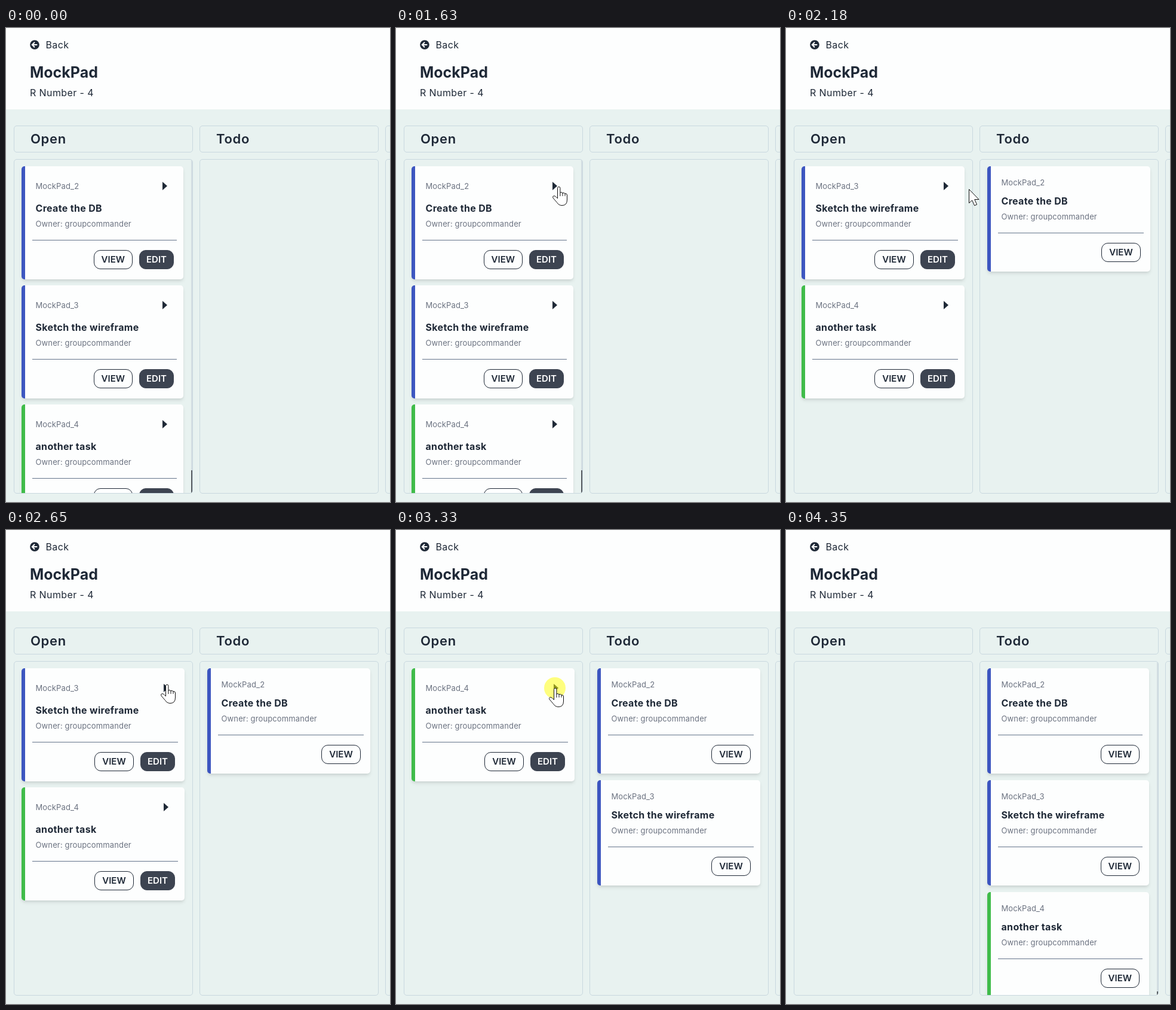
An HTML page for the animation above (4.7 s loop, 643 px wide and 792 px high).

```html
<!DOCTYPE html>
<html lang="en">
<head>
<meta charset="utf-8">
<title>Task board</title>
<style>
  * { box-sizing: border-box; }
  html, body { margin: 0; width: 100%; height: 100%; overflow: hidden; }
  body {
    position: relative; background: #e8f2f0; color: #1f2937;
    font: 16px/20px Inter, sans-serif;
  }
  header, header > *, .head, .list, .card > *, svg, #spot { position: absolute; white-space: nowrap; }
  header { inset: 0 0 auto; height: 136px; background: #fdfefe; }
  header span { letter-spacing: .025em; }
  h1 { left: 40px; top: 63.5px; margin: 0; font-size: 25px; line-height: 20px; }
  .head, .list { width: 300px; border: 1px solid #c9d8df; border-radius: 5px; }
  .head {
    top: 163px; height: 45px; padding-left: 27px;
    font-size: 22px; font-weight: 600; line-height: 42px; letter-spacing: .03em;
  }
  .list {
    top: 219px; height: 559px; padding: 11px 0 0 12px; overflow: hidden;
    display: flex; flex-direction: column; gap: 11px;
  }
  #open { gap: 10px; }
  .card {
    --d: 0px; position: relative; flex: none; width: 273px; height: calc(189px - var(--d));
    background: #fdfefe; border-left: 6px solid #3d56c0; border-radius: 5px;
    box-shadow: 0 4px 6px -1px rgba(0,0,0,.1), 0 2px 4px -1px rgba(0,0,0,.06);
  }
  #todo .card { --d: 12px; height: 176px; }
  .full .card { width: 271px; }
  .card.green { border-color: #40bc4a; }
  .id, .owner, .name { left: 17.5px; }
  .id, .owner { font-size: 13px; letter-spacing: .01em; color: #6b7280; }
  .id { top: calc(22.5px - var(--d) / 2); }
  .name { top: calc(60px - var(--d)); font-weight: 700; letter-spacing: .02em; }
  .owner { top: calc(86px - var(--d)); }
  .rule { left: 12px; right: 11px; top: calc(123px - var(--d)); height: 1px; background: #64748b; }
  .next { right: 27px; top: 26px; width: 8px; height: 14px; background: #1f2937; clip-path: polygon(0 0, 100% 50%, 0 100%); }
  .btn {
    right: 16px; top: calc(140px - var(--d)); width: 66px; height: 32px;
    border: 1px solid #1f2937; border-radius: 11px;
    font-size: 15px; font-weight: 600; line-height: 30px; text-align: center;
  }
  #open .view { right: 85px; }
  .full .view { width: 65.4px; }
  .edit { width: 58px; background: #3d4451; border-color: #3d4451; color: #fff; }
  #todo .edit, #todo .next { display: none; }
  .full::before, .full::after { content: ""; position: absolute; right: 0; top: 0; bottom: 0; width: 2px; background: #d3dde2; }
  .full::after { top: auto; height: 38px; background: #565b60; }
  #todo.full::after { height: 6px; }
  #spot { left: -18px; top: -18px; width: 36px; height: 36px; border-radius: 50%; background: rgba(255,255,0,.5); }
  #cursor { position: absolute; left: 0; top: 0; }
  #cursor svg { left: 0; top: 0; overflow: visible; fill: #fff; stroke: #111; }
  #cursor #hand { left: -10px; }
</style>
</head>
<body>
<header>
  <svg style="left:40px;top:20px" width="16" height="16" viewBox="0 0 16 16">
    <circle cx="8" cy="8" r="7.8" fill="#1f2937"/>
    <path d="M8 3.8 3.8 8 8 12.2M4 8h8.3" fill="none" stroke="#fff" stroke-width="2"/>
  </svg>
  <span style="left:66.5px;top:17.5px">Back</span>
  <h1>MockPad</h1>
  <span style="left:40px;top:98px">R Number - 4</span>
</header>
<div class="head" style="left:13px">Open</div>
<div class="head" style="left:324px">Todo</div>
<div class="head" style="left:635px"></div>
<div class="list" id="open" style="left:13px"></div>
<div class="list" id="todo" style="left:324px"></div>
<div class="list" style="left:635px"></div>
<div id="cursor">
  <div id="spot"></div>
  <svg id="arrow" width="18" height="29"><path d="M.5.5v23l5.2-4.6 3.9 8.8 4-1.7-3.8-8.5H17z"/></svg>
  <svg id="hand" width="25" height="32">
    <path d="M8.5 19V2.5a2.2 2.2 0 0 1 4.4 0V10q2.4-1.5 4.1.8 2.4-1.3 4 1 3.2-.8 3.5 2.2v8q0 9.5-8.5 9.5-5.5 0-8.5-5L.8 18.8q-1-3 2-3.4 2 0 5.7 4.4z"/>
    <path d="M12.9 10v6M17 10.8v5M21 11.8v4" fill="none"/>
  </svg>
</div>
<script>
const $ = id => document.getElementById(id);
const LOOP = 4700, START = 660, STEP = 68.26, END = 4340;
const tasks = [
  { name: 'Create the DB', moved: 1680 },
  { name: 'Sketch the wireframe', moved: 2700 },
  { name: 'another task', moved: 3590, tone: 'green' }
];
const clicks = [1400, 2430, 3320];
// time, x, y of the pointer's hot spot
const path = [
  [660, 592, 319], [1150, 278, 267], [1350, 272, 265], [1690, 272, 265],
  [2180, 306, 269], [2310, 306, 269], [2440, 269, 260], [2700, 269, 258],
  [3000, 269, 258], [3130, 266, 264], [3690, 266, 264], [3799, 282, 269], [4275, 597, 778]
];

function addCard(list, task, i) {
  const el = document.createElement('div');
  el.className = 'card ' + (task.tone || '');
  el.innerHTML = `<span class="id">MockPad_${i + 2}</span><i class="next"></i>
    <span class="name">${task.name}</span><span class="owner">Owner: groupcommander</span>
    <i class="rule"></i><span class="btn view">VIEW</span><span class="btn edit">EDIT</span>`;
  return list.appendChild(el);
}
tasks.forEach((task, i) => {
  task.open = addCard($('open'), task, i);
  task.todo = addCard($('todo'), task, i);
  task.view = task.todo.querySelector('.view');
});

const show = (el, on) => { el.style.display = on ? '' : 'none'; };

function pop(age) {
  const p = Math.min(1, Math.max(0, age / 250));
  return p < .4 ? .98 + p * .1 : 1.02 - (p - .4) / 30;
}

function pointerAt(t) {
  const n = path.findIndex(p => p[0] > t);
  if (n < 0) return path[path.length - 1].slice(1);
  if (n === 0) return path[0].slice(1);
  const [a, b] = [path[n - 1], path[n]];
  const u = (t - a[0]) / (b[0] - a[0]), e = u * u * (3 - 2 * u);
  return [1, 2].map(k => Math.round(a[k] + (b[k] - a[k]) * e));
}

function draw(now) {
  const time = now % LOOP;
  const t = time < START ? 0 : START + Math.floor((time - START) / STEP) * STEP;
  for (const task of tasks) {
    const done = t >= task.moved;
    const scale = pop(t - task.moved);
    show(task.open, !done);
    show(task.todo, done);
    task.view.style.transform = scale === 1 ? '' : `scale(${scale})`;
  }
  $('open').classList.toggle('full', t < tasks[0].moved);
  $('todo').classList.toggle('full', t >= tasks[2].moved);

  const [x, y] = pointerAt(t), over = x < 282;
  show($('cursor'), t >= START && t < END);
  $('cursor').style.transform = `translate(${x}px, ${y}px)`;
  show($('hand'), over);
  show($('arrow'), !over);
  show($('spot'), clicks.some(c => t >= c && t < c + 130));
}

const t0 = performance.now();
function tick() {
  draw(performance.now() - t0);
  requestAnimationFrame(tick);
}
tick();
</script>
</body>
</html>
```
